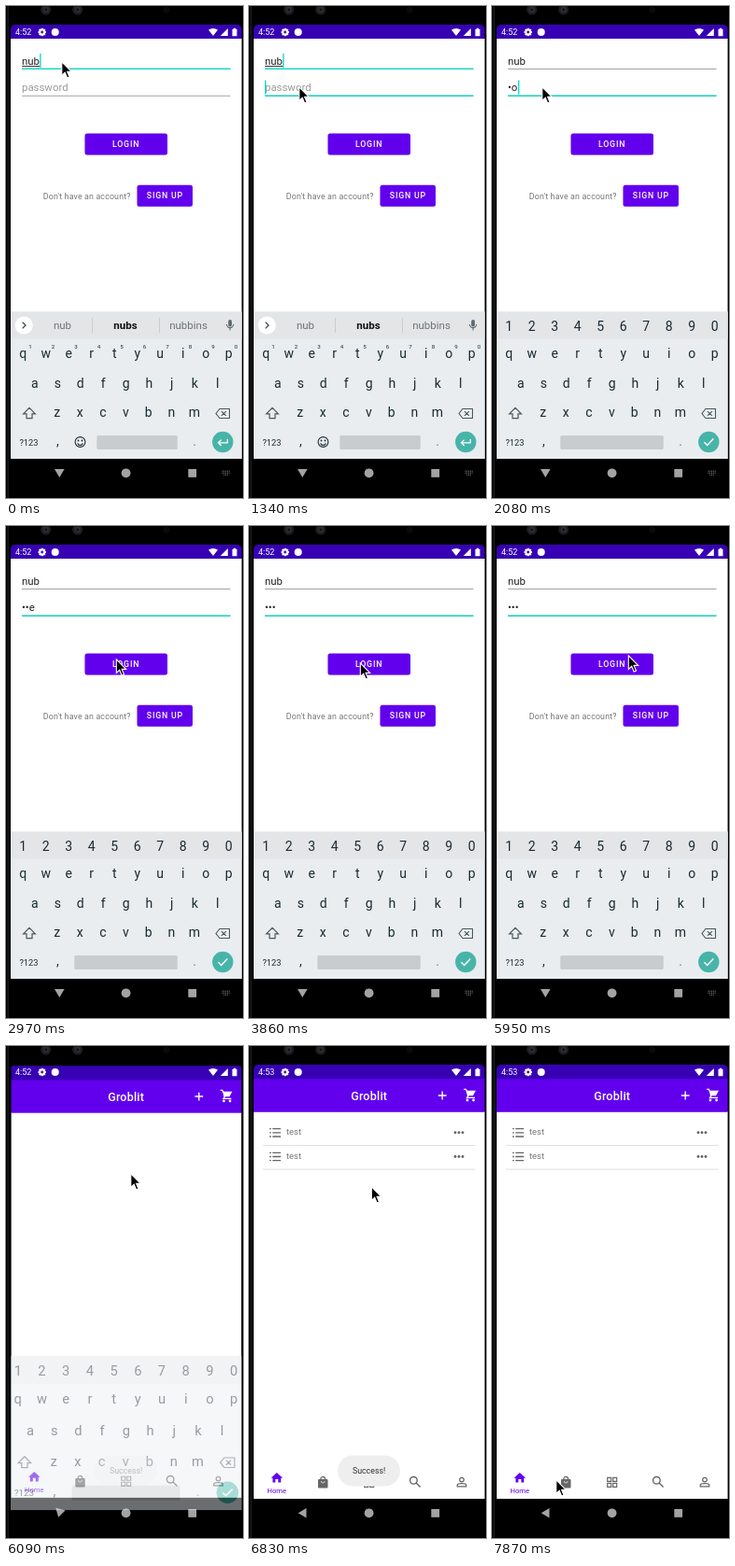
An HTML page that plays this animation: 254x527 px, repeating every 8000 ms.

```html
<!DOCTYPE html>
<html lang="en">
<head>
<meta charset="utf-8">
<title>Login on a phone</title>
<style>
  html, body { margin: 0; width: 100%; height: 100%; overflow: hidden; background: #000; }
  svg { display: block; width: 254px; height: 527px; font-family: Roboto, sans-serif; }
</style>
</head>
<body>
<svg id="stage" viewBox="0 0 254 527" xmlns="http://www.w3.org/2000/svg"></svg>
<script>
const LOOP = 8000, TICK = 148.4;
const PURPLE = '#6200ee', DARK = '#3700b3', TEAL = '#03dac5', INK = '#1a2a32', GREY = '#757575';

// Markup helpers
const rect = (x, y, w, h, fill, more = '') =>
  `<rect x="${x}" y="${y}" width="${w}" height="${h}" fill="${fill}" ${more}/>`;
const circle = (x, y, r, fill, more = '') =>
  `<circle cx="${x}" cy="${y}" r="${r}" fill="${fill}" ${more}/>`;
const text = (x, y, s, size, fill, more = '') =>
  `<text x="${x}" y="${y}" font-size="${size}" fill="${fill}" ${more}>${s}</text>`;
const mid = 'text-anchor="middle"';
const solid = (x, y, d, fill) => `<path transform="translate(${x} ${y})" d="${d}" fill="${fill}"/>`;
const line = (x, y, d, color, w = 1.2, more = '') =>
  `<path transform="translate(${x} ${y})" d="${d}" fill="none" stroke="${color}" stroke-width="${w}" ${more}/>`;
const group = (id, body, more = '') => `<g id="${id}" ${more}>${body}</g>`;

const button = (x, y, w, label, tx) =>
  rect(x, y + .6, w, 23, '#000', 'rx="2.5" opacity=".12"') +
  rect(x, y, w, 23, PURPLE, 'rx="2.5"') +
  text(tx, y + 14.6, label, 8.8, '#fff', 'font-weight="500" letter-spacing=".78"');

function frame() {
  const lens = x => circle(x, 4, 5.5, '#1c1d20') + circle(x, 4, 3.2, '#2d2e33') + circle(x, 4, 1.4, '#101114');
  return rect(0, 0, 254, 527, '#000') + rect(1.6, 0, 1, 527, '#24282b') +
    lens(42.7) + lens(76.7) + circle(172, 4, 3.5, '#0a0a0c');
}

function login() {
  return rect(5, 20, 248, 15.5, DARK) + rect(5, 35, 248, 450, '#fff') +
    text(17, 62.7, 'nub', 11.4, '#212121') +
    group('compose', rect(17, 64, 19.3, .9, '#212121')) +
    rect(17, 67, 223.5, .8, '#8a8a8a') + group('line1', rect(17, 66.6, 223.5, 1.3, TEAL)) +
    group('caret1', rect(36.2, 51, 1.3, 15, TEAL)) +
    text(17, 91, 'password', 11.4, '#9a9a9a', 'id="entry"') +
    rect(17, 95.8, 223.5, .8, '#8a8a8a') + group('line2', rect(17, 95.5, 223.5, 1.3, TEAL)) +
    rect(17, 79.5, 1.3, 15, TEAL, 'id="caret2"') +
    button(84.5, 136.5, 88.5, 'LOGIN', 114) +
    circle(118, 146, 0, '#fff', 'id="ripple" clip-path="url(#loginClip)"') +
    text(39.8, 206.7, "Don't have an account?", 8.8, GREY, 'letter-spacing=".17"') +
    button(140.5, 191.8, 59.5, 'SIGN UP', 150.8);
}

function keyboard() {
  const row = (keys, x, y, size = 14) =>
    [...keys].map((c, i) => text(x + 24.5 * i, y, c, size, INK, mid)).join('');
  const sep = x => rect(x, 334, .8, 16, '#c3c7ca');
  const words =
    circle(19.2, 342, 9.6, '#fff') + line(19.2, 342, 'M-1.6-3.4L1.8 0L-1.6 3.4', '#37474f', 1.3) +
    text(60.5, 346.3, 'nub', 11.5, '#6b757a', mid) + sep(92) +
    text(128, 346.3, 'nubs', 11.5, '#111', mid + ' font-weight="700"') + sep(164) +
    text(195.5, 346.3, 'nubbins', 11.5, '#6b757a', mid) +
    rect(238.2, 336, 3.8, 7.4, '#5f6b71', 'rx="1.9"') +
    line(240.1, 341, 'M-3.6 0A3.6 3.6 0 0 0 3.6 0M0 3.6V6.6', '#5f6b71', 1.1) +
    row('1234567890', 26, 366.5, 6.2) +
    circle(79.5, 467, 5.4, 'none', `stroke="${INK}" stroke-width="1.1"`) +
    circle(77.5, 465.5, .9, INK) + circle(81.5, 465.5, .9, INK) +
    line(79.5, 468.3, 'M-2.8 0A2.9 2.9 0 0 0 2.8 0', INK, 1.2) +
    rect(97.3, 460, 86.5, 15, '#c8cccf', 'rx="1.5"');
  const digits = row('1234567890', 18.2, 347.5) + rect(73.3, 460, 110.5, 15, '#c8cccf', 'rx="1.5"');
  return rect(5, 327.5, 248, 157.5, '#e9edf0') + rect(5, 327.5, 248, 29, '#e3e5e7') +
    row('qwertyuiop', 18.2, 376.7) + row('asdfghjkl', 30.8, 408.5) + row('zxcvbnm', 54.8, 440.3) +
    line(25, 436.3, 'M0-6L6.4 .6H3V5.3H-3V.6H-6.4Z', '#4a575d') +
    line(232.5, 436.5, 'M-7.5 0L-3.6-5H7V5H-3.6ZM-1.6-2.4L3.4 2.4M3.4-2.4L-1.6 2.4', '#4a575d', 1.1) +
    text(24.5, 470.5, '?123', 9.3, INK, mid) + text(55.5, 471, ',', 14, INK, mid) +
    text(202, 471, '.', 14, '#6b757a', mid) + circle(232.3, 467, 11.2, '#47b4a9') +
    group('words', words + line(232.3, 467, 'M5-3V.8H-4.6M-1.6-2.4L-4.8 .8L-1.6 4', '#fff', 1.3)) +
    group('digits', digits + line(232.3, 467, 'M-4.8 .2L-1.6 3.4L5-3.4', '#fff', 1.4));
}

function home() {
  const tab = '#666';
  const icons = y =>
    line(28, y, 'M-6-4.2H-4.3M-6 0H-4.3M-6 4.2H-4.3M-2.8-4.2H6M-2.8 0H6M-2.8 4.2H6', '#666', 1.3) +
    [-4, 0, 4].map(d => circle(225 + d, y, 1.45, '#666')).join('');
  const item = y => text(40, y + 2.5, 'test', 9.4, GREY) + rect(15, y + 13.5, 227.5, 1, '#dedede');
  const squares = [[-5, -5], [1, -5], [-5, 1], [1, 1]]
    .map(([x, y]) => `M${x} ${y}h4v4h-4z`).join('');
  return rect(5, 20, 248, 16, DARK) + rect(5, 70, 248, 415, '#fff') + rect(5, 35.3, 248, 35.5, PURPLE) +
    text(128.7, 57.8, 'Groblit', 12.6, '#fff', mid + ' font-weight="500" letter-spacing=".2"') +
    line(207.2, 53, 'M-4.4 0H4.4M0-4.4V4.4', '#fff', 1.4) +
    solid(237.2, 52.5, 'M-4-4.8H5.8L2.8 .8H-3.4Z', '#fff') +
    line(237.2, 52.5, 'M-7-6.2H-4.8L-2 .2L-3.6 2.9H4.8', '#fff', 1.3) +
    circle(234, 58, 1.4, '#fff') + circle(240.6, 58, 1.4, '#fff') +
    group('list', item(92.6) + item(118.1)) + group('listIcons', icons(92.8) + icons(118.5)) +
    solid(29.8, 462.3, 'M-6.3 .5L0-5.3L6.3 .5H4.4V5.3H1.5V1.6H-1.5V5.3H-4.4V.5Z', PURPLE) +
    text(29.8, 479, 'Home', 7.7, PURPLE, mid) +
    rect(74, 464, 10.5, 9.5, tab, 'rx="1"') +
    line(79.2, 464, 'M-2.4 0A2.4 2.6 0 0 1 2.4 0', tab) + line(79.2, 466, 'M-1.9 0A1.9 2 0 0 0 1.9 0', '#fff', .7) +
    line(128.7, 467.3, squares, tab) +
    line(177, 466, 'M3.2-.7A3.8 3.8 0 1 1-4.4-.7A3.8 3.8 0 1 1 3.2-.7M2.2 2L6.6 6.4', tab, 1.4) +
    circle(228, 464.6, 2.3, 'none', `stroke="${tab}" stroke-width="1.2"`) +
    line(228, 470.3, 'M-4.8 1.6V.2C-4.8-2.2 4.8-2.2 4.8 .2V1.6Z', tab);
}

function system() {
  const nav = '#a3a3a3';
  const teeth = [0, 45, 90, 135].map(a =>
    rect(37.6, 23.8, 2.2, 8.4, '#fff', `transform="rotate(${a} 38.7 28)"`)).join('');
  return text(10, 31.2, '4:52', 9, '#fff', 'id="clock"') +
    teeth + circle(38.7, 28, 3.2, '#fff') + circle(38.7, 28, 1.4, DARK) + circle(52.7, 28, 4, '#fff') +
    solid(222, 28, 'M-5-2.4Q0-5.8 5-2.4L0 4Z', '#fff') +
    solid(234, 28, 'M3.8-4V4H-4.2Z', '#fff') +
    solid(245, 28, 'M-2.5-3.2H-1.1V-4.3H1.1V-3.2H2.5V4.2H-2.5Z', '#fff') +
    rect(5, 485, 248, 30, '#000') +
    group('back', solid(0, 0, 'M-4.6 0L4.2-5.3V5.3Z', nav)) +
    circle(128.6, 500.3, 4.9, nav) + rect(195.3, 496, 8.8, 8.8, nav) +
    group('keysIcon', line(236, 500, 'M-4.5-1.8H4.5M-4.5 .2H4.5M-2.7 2.2H2.7', '#8a8a8a', 1, 'stroke-dasharray="1 .8"'));
}

const stage = document.getElementById('stage');
stage.innerHTML =
  `<clipPath id="loginClip">${rect(84.5, 136.5, 88.5, 23, '#000', 'rx="2.5"')}</clipPath>` +
  `<clipPath id="screen">${rect(5, 20, 247.6, 495, '#000', 'rx="5"')}</clipPath>` +
  frame() +
  `<g clip-path="url(#screen)">` +
  group('login', login()) + group('home', home()) + system() + group('keyboard', keyboard()) + '</g>' +
  group('toast', rect(95, 438.5, 67, 33, '#eeeeee', 'rx="16.5"') +
    text(128.6, 458, 'Success!', 8.8, '#333', mid)) +
  group('mouse', '<path d="M.3 .8V15.4L3.7 12.3L6.1 18L8.5 17L6.1 11.4H10.7Z" fill="#000" stroke="#fff" stroke-width="1.1"/>');

const el = {};
stage.querySelectorAll('[id]').forEach(n => el[n.id] = n);
const set = (id, props) => { for (const p in props) el[id].setAttribute(p, props[p]); };
const fade = (id, v) => set(id, { opacity: Math.max(0, Math.min(1, +v)) });
const between = (k, a, b) => k >= a && k < b;
const last = (rows, k) => rows.filter(r => r[0] <= k).pop();
const zoom = (cx, cy, s) => `translate(${cx} ${cy}) scale(${s}) translate(${-cx} ${-cy})`;

// [tick, x, y]
const MOUSE = [
  [0, 59.5, 59], [1, 59, 64], [2, 57, 74], [3, 55, 82], [4, 53.5, 86],
  [18, 66, 97], [19, 100, 128], [20, 118, 142], [21, 118, 145], [22, 119, 146],
  [38, 136, 146], [39, 153, 141], [40, 146, 138], [41, 133.5, 136],
  [46, 131, 150], [47, 122, 200], [48, 108, 280], [49, 94, 370],
  [50, 82, 440], [51, 74, 479], [52, 70, 472], [53, 68.5, 464]
];
// [tick, text, colour, caret x]
const ENTRY = [
  [0, 'password', '#9a9a9a', 17], [14, '•o', '#212121', 28], [16, '••e', '#212121', 30.5], [26, '•••', '#212121', 28.5]
];
// [tick, radius, opacity]
const RIPPLE = [[0, 0, 0], [21, 18, .22], [22, 42, .22], [23, 60, .12], [24, 0, 0]];

function draw(t) {
  const k = Math.floor((t + 10) / TICK);
  const p = Math.max(0, k - 40); // ticks since the home screen opened

  const [, x, y] = last(MOUSE, k);
  set('mouse', { transform: `translate(${x} ${y})` });

  fade('caret1', k < 4 || between(k, 7, 10));
  fade('line1', k < 10);
  fade('compose', k < 10);
  fade('line2', k >= 9);
  fade('caret2', between(k, 9, 18) || between(k, 30, 33));
  const [, word, color, cx] = last(ENTRY, k);
  el.entry.textContent = word;
  set('entry', { fill: color });
  set('caret2', { x: cx });
  const [, r, o] = last(RIPPLE, k);
  set('ripple', { r, opacity: o });

  fade('words', k < 10);
  fade('digits', k >= 10);
  fade('keyboard', Math.max(0, 1 - p / 2.6) ** 1.6);
  set('keyboard', { transform: zoom(128.6, 238, 1 + .122 * (1 - Math.exp(-p / 1.95))) });

  fade('login', p === 0);
  fade('home', p > 0);
  set('home', { transform: zoom(128.6, 254, p === 1 ? .995 : 1) });
  fade('list', k >= 45);
  fade('listIcons', k >= 46);
  fade('toast', Math.min((p - .65) / 1.2, (53 - k) / 2));

  el.clock.textContent = k < 43 ? '4:52' : '4:53';
  set('back', { transform: `translate(57.3 500.3) rotate(${p === 0 ? -90 : p === 1 ? -75 : 0})` });
  fade('keysIcon', p === 0);
}

const start = performance.now();
function loop() {
  draw((performance.now() - start) % LOOP);
  requestAnimationFrame(loop);
}
loop();
</script>
</body>
</html>
```
